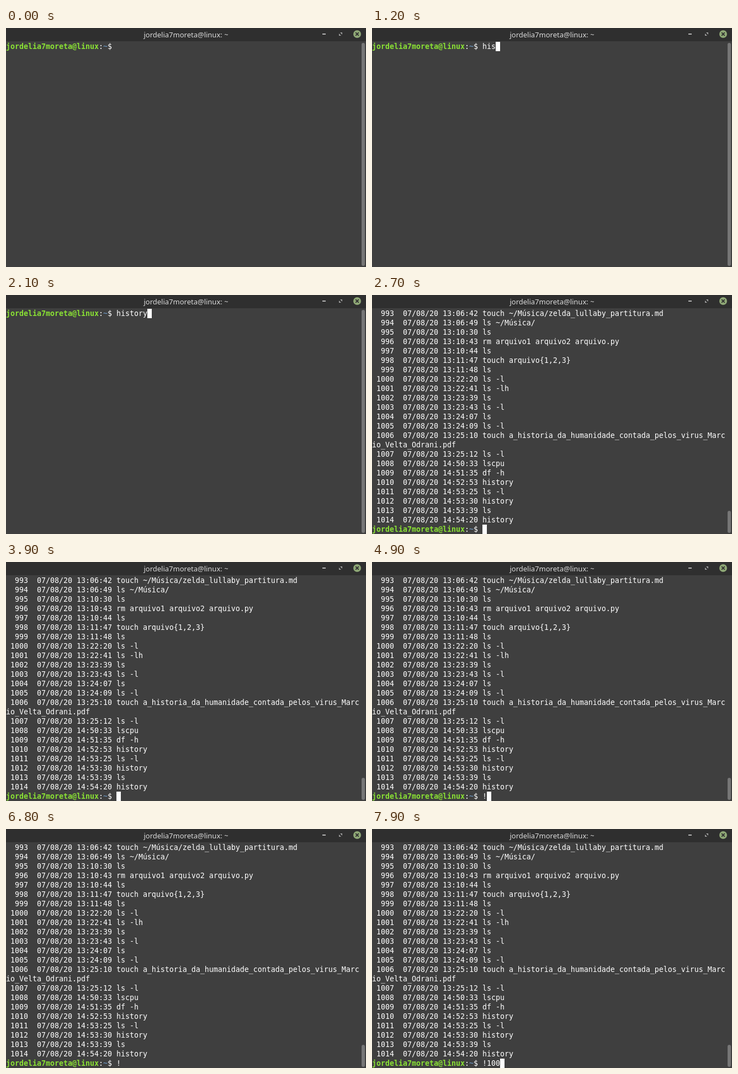
Write an HTML page that moves like this. It is 652 px wide and 433 px high and loops after 8000 ms.

```html
<!DOCTYPE html>
<html lang="pt">
<head>
<meta charset="utf-8">
<title>Terminal</title>
<style>
  html, body { margin: 0; width: 100%; height: 100%; overflow: hidden; background: #3f3f3f; }
  #bar { position: absolute; left: 0; top: 0; width: 652px; height: 24px; background: #2f2f2f; }
  #title {
    position: absolute; left: 0; top: 0; width: 652px; text-align: center; white-space: pre;
    font: 500 13px/25px "Noto Sans", "Open Sans", sans-serif; color: #dadada;
  }
  #bar svg { position: absolute; left: 0; top: 0; }
  #screen {
    position: absolute; left: 0; top: 25px; margin: 0; color: #fff;
    font: 13.29px/17px "DejaVu Sans Mono", monospace;
  }
  #screen b { color: #8ae234; }
  #screen i { color: #729fcf; font-style: normal; }
  #cursor { position: absolute; width: 8px; height: 17px; background: #fff; }
  #thumb { position: absolute; left: 644px; width: 6px; border-radius: 3px; background: #767676; }
</style>
</head>
<body>
<div id="bar">
  <div id="title"></div>
  <svg width="652" height="24">
    <path d="M573 11h6" stroke="#b4b4b4" stroke-width="2"/>
    <path d="M605 8h4v4zM603 10v4h4z" fill="#a0a0a0"/>
    <circle cx="636" cy="11" r="7" fill="#8fa876"/>
    <path d="M633.2 8.2l5.6 5.6m0-5.6l-5.6 5.6" stroke="#2f2f2f" stroke-width="1.8"/>
  </svg>
</div>
<pre id="screen"></pre>
<div id="cursor"></div>
<div id="thumb"></div>
<script>
const $ = id => document.getElementById(id);
const LOOP = 8000, ENTER = 2700, COLS = 80, CELL_W = 8, CELL_H = 17, TOP = 25;
const user = 'jordelia7moreta@linux';
const prompt = `<b>${user}</b>:<i>~</i>$ `;
const promptCols = user.length + 4;

const log = `13:06:42 touch ~/Música/zelda_lullaby_partitura.md
13:06:49 ls ~/Música/
13:10:30 ls
13:10:43 rm arquivo1 arquivo2 arquivo.py
13:10:44 ls
13:11:47 touch arquivo{1,2,3}
13:11:48 ls
13:22:20 ls -l
13:22:41 ls -lh
13:23:39 ls
13:23:43 ls -l
13:24:07 ls
13:24:09 ls -l
13:25:10 touch a_historia_da_humanidade_contada_pelos_virus_Marcio_Velta_Odrani.pdf
13:25:12 ls -l
14:50:33 lscpu
14:51:35 df -h
14:52:53 history
14:53:25 ls -l
14:53:30 history
14:53:39 ls
14:54:20 history`.split('\n').flatMap((entry, i) => {
  const line = `${String(993 + i).padStart(5)}  07/08/20 ${entry}`;
  return line.length > COLS ? [line.slice(0, COLS), line.slice(COLS)] : [line];
});

// Key press times for each typed command, and cursor toggles
const commands = [
  { text: 'history', keys: [400, 900, 1200, 1600, 1800, 2000, 2100] },
  { text: '!100', keys: [4900, 7400, 7600, 7900] }
];
const toggles = [400, 3300, 3900, 4500, 4700, 5600, 6200, 6800, 7400];

$('title').textContent = user + ': ~';
let shown;

function draw(t) {
  const listed = t >= ENTER;
  const { text, keys } = commands[+listed];
  const typed = text.slice(0, keys.filter(k => k <= t).length);
  const rows = listed ? log : [];
  const html = [...rows, prompt + typed].join('\n');
  if (html !== shown) $('screen').innerHTML = shown = html;

  const cursor = $('cursor').style;
  cursor.left = (promptCols + typed.length) * CELL_W + 'px';
  cursor.top = TOP + rows.length * CELL_H + 'px';
  cursor.visibility = toggles.filter(k => k <= t).length % 2 ? 'visible' : 'hidden';

  const thumb = $('thumb').style;
  thumb.top = (listed ? 391 : 27) + 'px';
  thumb.height = (listed ? 40 : 404) + 'px';
}

function frame() {
  draw(performance.now() % LOOP);
  requestAnimationFrame(frame);
}
frame();
</script>
</body>
</html>
```
